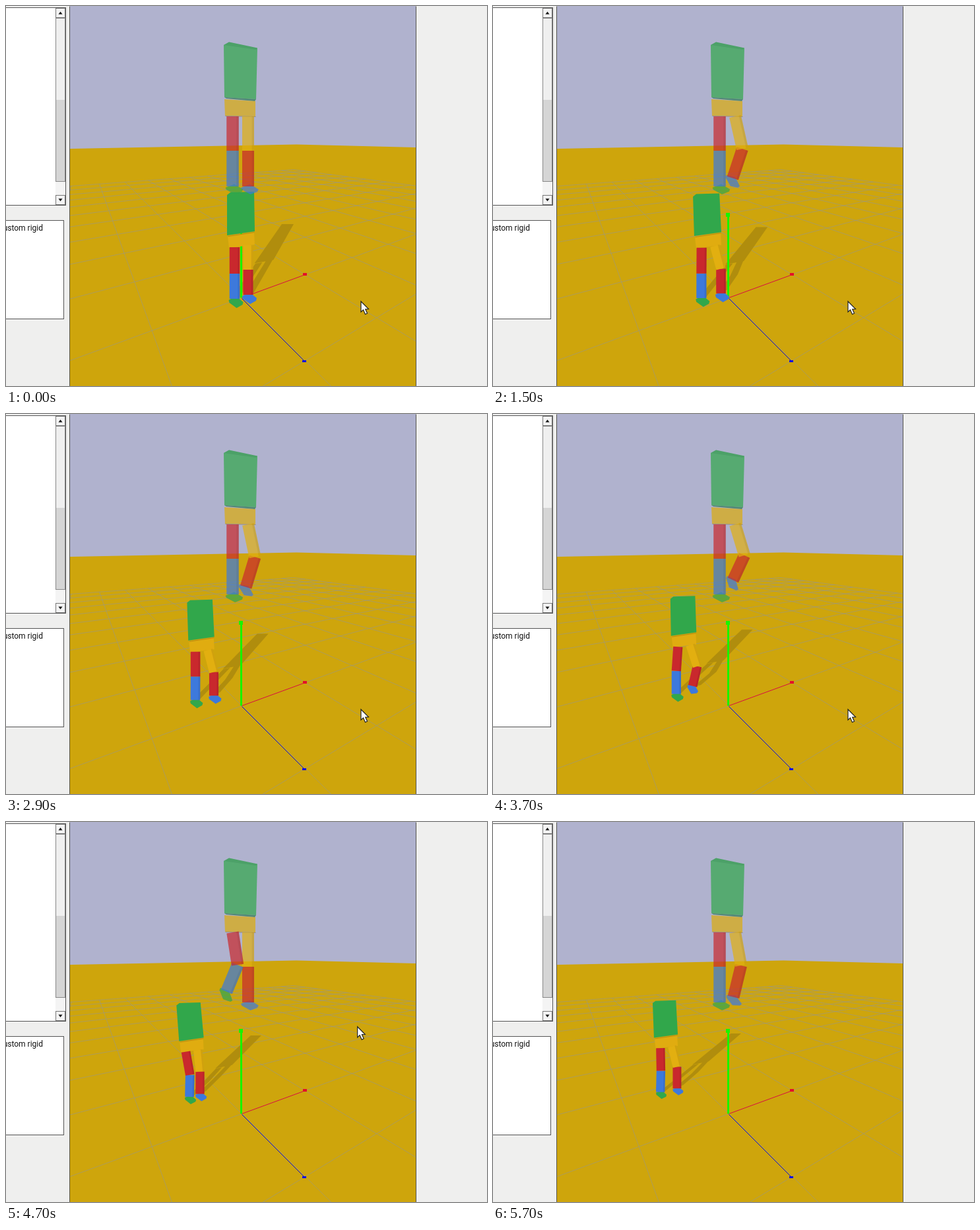
Recreate the animation shown at these times as an HTML page with a canvas. Size 729 px wide and 575 px high, loop 5800 ms.

```html
<!DOCTYPE html>
<html lang="en">
<head>
<meta charset="utf-8">
<title>Walking figure</title>
<style>
  html, body { margin: 0; width: 100%; height: 100%; overflow: hidden; background: #efefee; }
  canvas { display: block; }
</style>
</head>
<body>
<canvas id="stage" width="729" height="575"></canvas>
<script>
const ctx = document.getElementById('stage').getContext('2d');
const LOOP = 5800, STEP = 100, REST = 300, GAIT = 704, GAIT_START = 2842;
const GREEN = '#31a74b', YELLOW = '#e2af10', RED = '#c9282d', BLUE = '#3d79dc';
const LEFT_COLORS = [RED, BLUE, GREEN], RIGHT_COLORS = [YELLOW, RED, BLUE];
const DEG = Math.PI / 180;

// time, pelvis x, pelvis y
const PATH = [
  [0, 356, 344], [1000, 336, 347], [2900, 296, 340],
  [3700, 289, 333], [4700, 281, 329], [5700, 262, 324]
];
const FOOT = [[-9, 2], [2, -4], [13, 5], [12, 9], [3, 14], [-8, 6]];

const wrap = v => ((v % 1) + 1) % 1;
const wave = v => Math.sin(2 * Math.PI * v);

function pathAt(t) {
  const i = Math.max(1, PATH.findIndex(p => p[0] >= t));
  const [a, b] = [PATH[i - 1], PATH[i]];
  const k = (t - a[0]) / (b[0] - a[0]);
  return [a[1] + (b[1] - a[1]) * k, a[2] + (b[2] - a[2]) * k];
}

function poly(points, fill) {
  ctx.beginPath();
  points.forEach(([x, y]) => ctx.lineTo(x, y));
  ctx.closePath();
  ctx.fillStyle = fill;
  ctx.fill();
}

// coordinates name pixels, so strokes run through pixel centres
function line(x1, y1, x2, y2, color, width = 1) {
  ctx.beginPath();
  ctx.moveTo(x1 + .5, y1 + .5);
  ctx.lineTo(x2 + .5, y2 + .5);
  ctx.strokeStyle = color;
  ctx.lineWidth = width;
  ctx.stroke();
}

function rect(x, y, w, h, fill, stroke) {
  ctx.fillStyle = fill;
  ctx.fillRect(x, y, w, h);
  if (!stroke) return;
  ctx.strokeStyle = stroke;
  ctx.lineWidth = 1;
  ctx.strokeRect(x + .5, y + .5, w - 1, h - 1);
}

function limb(a, b, width, color) {
  const len = Math.hypot(b[0] - a[0], b[1] - a[1]);
  const nx = (b[1] - a[1]) / len * width / 2, ny = -(b[0] - a[0]) / len * width / 2;
  const side = (p, k) => [p[0] + nx * k, p[1] + ny * k];
  poly([side(a, -1), side(a, 1), side(b, 1), side(b, -1)], color);
  poly([side(a, .62), side(a, 1), side(b, 1), side(b, .62)], 'rgba(0,0,0,.08)');
}

// thigh turns forward, shin turns back; angles in degrees from vertical
function makeLeg(hip, thigh, thighAngle, shin, shinAngle) {
  const f = thighAngle * DEG, b = shinAngle * DEG;
  const knee = [hip[0] + thigh * Math.sin(f), hip[1] + thigh * Math.cos(f)];
  const ankle = [knee[0] - shin * Math.sin(b), knee[1] + shin * Math.cos(b)];
  return { hip, knee, ankle, turn: 1.8 * b };
}

function drawLeg({ hip, knee, ankle, turn }, width, [upper, lower, sole], footX, footY, place = p => p) {
  const c = Math.cos(turn), s = Math.sin(turn);
  const toes = FOOT.map(([x, y]) => [x * footX, y * footY])
    .map(([x, y]) => [ankle[0] + x * c - y * s, ankle[1] + x * s + y * c]);
  poly(toes.map(place), sole);
  limb(place(knee), place(ankle), width, lower);
  limb(place(hip), place(knee), width, upper);
}

function ground(x, z) {
  const w = 1 + .174 * x - .287 * z;
  return [(357 + 174.7 * x - 33.9 * z) / w, (441 + 35.67 * x - 58.83 * z) / w];
}

function drawGrid() {
  const color = 'rgba(150,150,140,.62)';
  for (let i = -10; i <= 10; i++) {
    const near = Math.min(10, (.95 + .174 * i) / .287);
    const left = Math.max(-10, (.287 * i - .95) / .174);
    if (near > -10) line(...ground(i, -10), ...ground(i, near), color);
    if (left < 10) line(...ground(left, i), ...ground(10, i), color);
  }
}

function drawScene() {
  rect(97, 0, 524, 575, '#b0b2ce');
  poly([[97, 216], [440, 209.5], [621, 214], [621, 575], [97, 575]], '#cea50c');
  drawGrid();
}

function drawAxes() {
  line(357, 441, 453, 406, '#e3102a');
  rect(450, 404, 6, 4, '#e3102a');
  line(357, 442, 452, 537, '#1010c8');
  rect(449, 536, 6, 3, '#1010e0');
  line(356, 441, 356, 316, '#18f500', 3);
  rect(353, 313, 6, 6, '#18f500');
}

function ghostLeg(hip, reach, phase, ramp) {
  const u = Math.min(1, 2 * wrap(phase));
  const lift = Math.sin(Math.PI * u) * ramp;
  const lead = Math.sin(Math.PI * u ** .8) * ramp;
  return makeLeg(hip, 52 - 3 * lift, reach * Math.sqrt(Math.max(0, lift)), 54 - 13 * lift, 25 * lead);
}

function drawGhost(phase, ramp) {
  ctx.globalAlpha = .7;
  poly([[330, 59], [338, 54.5], [381, 63.5], [379, 141], [331, 138]], GREEN);
  poly([[330, 59], [338, 54.5], [381, 63.5], [379, 66]], 'rgba(20,110,50,.2)');
  poly([[331, 138], [379, 141], [377, 144], [334, 140]], '#2d7850');
  poly([[331, 141], [378, 144], [378, 167], [332, 166]], '#dcac0c');
  line(332, 166, 378, 167, 'rgba(110,90,40,.6)');
  drawLeg(ghostLeg([367, 167], 17, phase, ramp), 18, RIGHT_COLORS, 1.2, .85);
  drawLeg(ghostLeg([343.5, 167], 10, phase + .5, ramp), 18.5, LEFT_COLORS, 1.2, .85);
  ctx.globalAlpha = 1;
}

function walkerLeg(hip, thigh, rest, swing, bend, phase, ramp) {
  const flex = Math.max(0, wave(phase - .1)) ** 2 * ramp;
  return makeLeg(hip, thigh, (rest + swing * wave(phase)) * ramp, 38 - 10 * flex, bend * flex);
}

function drawShadow(px, py, s, legs, lean) {
  const k = (356 - px) / 94;
  const tipX = px + 71 + 36 * k, tipY = py - 14 + 10 * k, baseY = py + 97 * s;
  const cast = ([x, y]) => {
    const h = (97 - y) / 158;
    return [px + (tipX - px) * h + x * s * (1 - .55 * h),
      baseY + (tipY - baseY) * h - x * .25 * (1 - h)];
  };
  ctx.beginPath();
  const add = points => {
    points.map(cast).forEach((p, i) => i ? ctx.lineTo(...p) : ctx.moveTo(...p));
    ctx.closePath();
  };
  const strip = (a, b) => add([[a[0] - 7, a[1]], [a[0] + 7, a[1]], [b[0] + 7, b[1]], [b[0] - 7, b[1]]]);
  add([[-20 + lean, -61], [20 + lean, -61], [20, 20], [-19, 20]]);
  for (const { hip, knee, ankle } of legs) {
    strip(hip, knee);
    strip(knee, ankle);
  }
  ctx.fillStyle = '#b08d0d';
  ctx.fill();
}

function drawWalker(t, phase, ramp) {
  const [px, py] = pathAt(t), s = Math.min(1, 1.02 - t * 28e-6);
  const lean = (2 * wave(phase) - 3) * ramp;
  const place = ([x, y]) => [px + x * s, py + y * s];
  const right = walkerLeg([11, 18], 37, 11, 7, 28, phase, ramp);
  const left = walkerLeg([-9.5, 21], 40, 4, 8, 22, phase + .5, ramp);
  drawShadow(px, py, s, [left, right], lean);
  drawAxes();
  poly([[-20, 4], [20, -2], [21, 17], [-18, 22]].map(place), '#e0ac10');
  drawLeg(right, 15 * s, RIGHT_COLORS, s, s, place);
  drawLeg(left, 15.5 * s, LEFT_COLORS, s, s, place);
  poly([[-21, 3], [21, -3], [20 + lean, -63], [-16 + lean, -62], [-21 + lean, -58]].map(place), GREEN);
  line(...place([-20, 4]), ...place([20, -2]), '#b98b12');
}

function arrow(x, y, dir) {
  poly([[x - 3, y + 2 * dir], [x + 3, y + 2 * dir], [x, y - 2 * dir]], '#111');
}

function drawPanels() {
  rect(0, 0, 97, 575, '#efefee');
  rect(621, 0, 108, 575, '#efefee');
  line(96, 0, 96, 575, '#55554f');
  line(621, 0, 621, 575, '#55554f');
  rect(-2, 2, 93, 300, '#fff', '#555');
  rect(75, 3, 15, 298, '#f4f4f4');
  rect(75, 18, 15, 248, '#efefef', '#888');
  rect(76, 142, 13, 123, '#d5d5d5');
  rect(75, 3, 15, 15, '#f3f3f3', '#777');
  rect(75, 286, 15, 15, '#f3f3f3', '#777');
  arrow(82.5, 10.5, 1);
  arrow(82.5, 293.5, -1);
  rect(-2, 324, 90, 150, '#fff', '#555');
  ctx.font = '12px Roboto, "Liberation Sans", sans-serif';
  ctx.textAlign = 'right';
  ctx.fillStyle = '#111';
  ctx.fillText('custom rigid', 56, 340);
}

function drawCursor(t) {
  const q = Math.max(0, (t - 4500) / 300);
  if (q > 1) return;
  const x = 538 - 12 * q ** 2, y = 447 - 363 * q ** 2.4;
  const shape = [[0, 0], [0, 16], [3.5, 12.8], [6.5, 19.5], [9.5, 18], [6.7, 11.8], [11.5, 11.5]];
  poly(shape.map(([dx, dy]) => [x + dx, y + dy]), '#fff');
  ctx.strokeStyle = '#222';
  ctx.lineWidth = 1.2;
  ctx.stroke();
}

function draw(t) {
  const phase = wrap((t - GAIT_START) / GAIT);
  const ramp = t < REST ? 0 : Math.min(1, (t - 200) / 400);
  drawScene();
  drawWalker(t < REST ? 0 : t, phase, ramp);
  drawGhost(phase, ramp);
  drawPanels();
  drawCursor(t);
}

const start = performance.now();
function tick() {
  const elapsed = (performance.now() - start) % LOOP;
  draw(Math.floor(elapsed / STEP) * STEP);
  requestAnimationFrame(tick);
}
tick();
</script>
</body>
</html>
```
